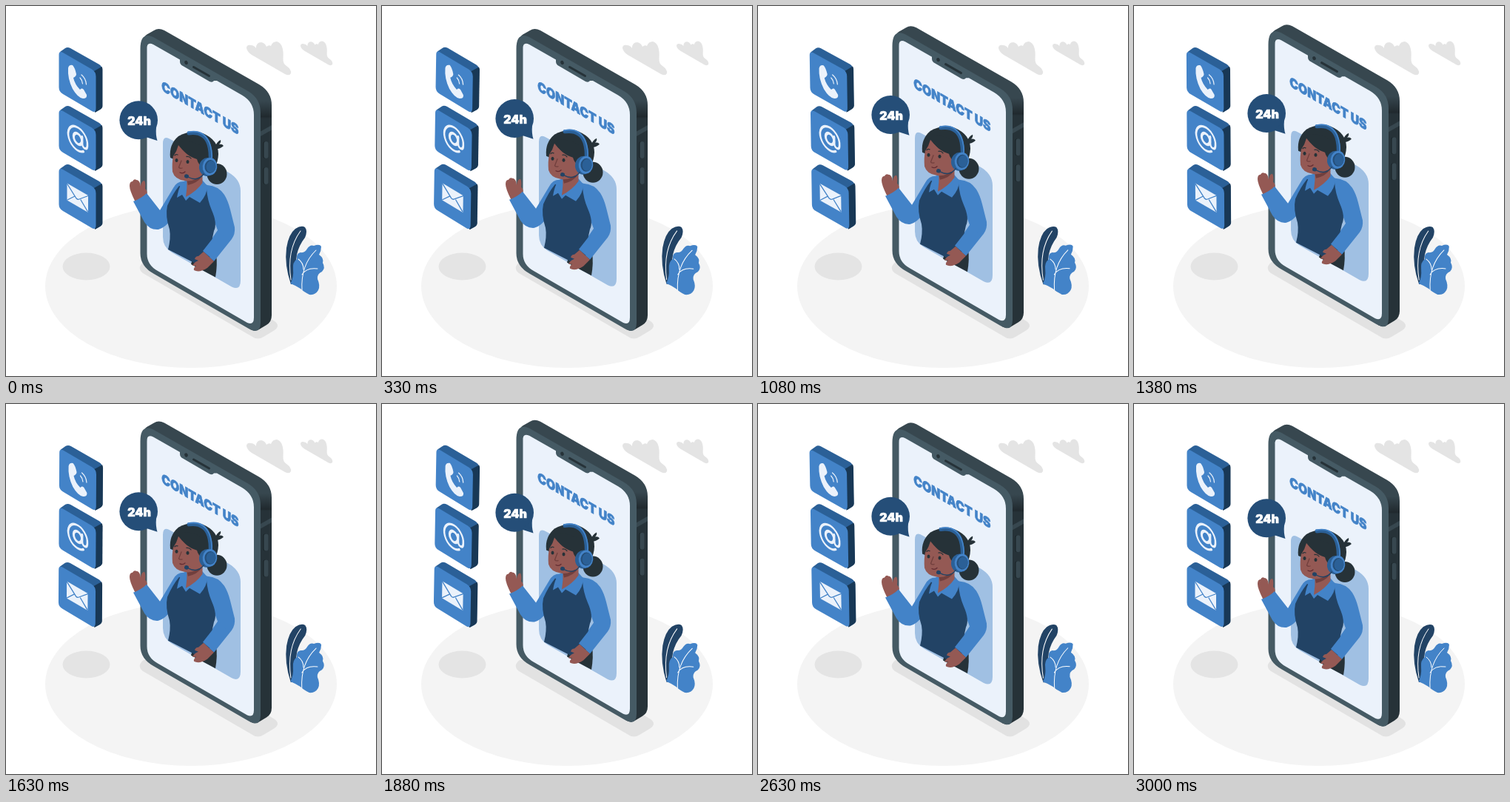
An HTML page with a canvas that plays this animation: 500x500 px, repeating every 3.04 s.

```html
<!DOCTYPE html>
<html lang="en">
<head>
<meta charset="utf-8">
<title>Contact us</title>
<style>
  html, body { margin: 0; width: 100%; height: 100%; overflow: hidden; background: #fff; }
  canvas { display: block; width: 500px; height: 500px; }
</style>
</head>
<body>
<canvas id="stage"></canvas>
<script>
const LOOP = 3040, FLOAT = 3000, WIND = 1500, DELAY = 500;
const BLUE = '#4383c8', MID = '#2b6097', DEEP = '#254e78', NAVY = '#224365', SIDE = '#183856';
const INK = '#263238', SLATE = '#37474f', FRAME = '#455a64', SKIN = '#945954', SKIN2 = '#713f3d';
const PALE = '#ebf2fb', PANEL = '#a0c0e3', GREY = '#e2e2e2';

const canvas = document.getElementById('stage');
const ctx = canvas.getContext('2d');
const ratio = window.devicePixelRatio || 1;
canvas.width = canvas.height = 500 * ratio;

function fill(d, color) {
  ctx.fillStyle = color;
  ctx.fill(new Path2D(d));
}

function line(d, color, width) {
  ctx.strokeStyle = color;
  ctx.lineWidth = width;
  ctx.lineCap = ctx.lineJoin = 'round';
  ctx.stroke(new Path2D(d));
}

function oval(x, y, rx, ry, color, turn = 0) {
  ctx.fillStyle = color;
  ctx.beginPath();
  ctx.ellipse(x, y, rx, ry, turn, 0, Math.PI * 2);
  ctx.fill();
}

function pill(x, y, w, h, color) {
  ctx.fillStyle = color;
  ctx.beginPath();
  ctx.roundRect(x, y, w, h, w / 2);
  ctx.fill();
}

function heavy(text, x, y, size, color) {
  ctx.font = `900 ${size}px Inter, "Open Sans", sans-serif`;
  ctx.fillStyle = ctx.strokeStyle = color;
  ctx.lineWidth = 0.7;
  ctx.lineJoin = 'round';
  ctx.fillText(text, x, y);
  ctx.strokeText(text, x, y);
}

function group(draw) {
  ctx.save();
  draw();
  ctx.restore();
}

function shifted(x, y, draw) {
  group(() => { ctx.translate(x, y); draw(); });
}

function turned(x, y, deg, draw) {
  group(() => {
    ctx.translate(x, y);
    ctx.rotate(deg * Math.PI / 180);
    ctx.translate(-x, -y);
    draw();
  });
}

// Isometric plane facing left, with its zero point at x, y
function iso(x, y, draw) {
  group(() => { ctx.transform(0.866, 0.5, 0, 1, x, y); draw(); });
}

// Linear rise of 10 px and back
function lift(t) {
  if (t < 0) return 0;
  const p = (t % FLOAT) / FLOAT;
  return -10 * (1 - Math.abs(1 - 2 * p));
}

// Linear sway: 0, +1 at a quarter, -1 at three quarters, 0
function sway(t) {
  const p = (t % WIND) / WIND;
  return p < 0.25 ? 4 * p : p < 0.75 ? 2 - 4 * p : 4 * p - 4;
}

function cloud() {
  fill('M325 57Q325 52 331 53Q335 53 338 57Q338 49 345 49Q350 50 352 55Q355 52 358 54Q360 48 366 48Q376 51 374.500 71Q374 78 379 81Q386 86 385 91Q383 95 377 92L332 66Q326 62 325 57Z', '#e4e4e4');
}

function ground() {
  oval(250, 378.500, 197, 110.500, '#f4f4f4');
  oval(108.500, 352, 32, 18.500, '#e4e4e4');
  fill('M186 346Q176 354 185 361L333 447Q340 452 348 447L363 438Q371 432 363 426L230 345Z', GREY);
  cloud();
  group(() => {
    ctx.translate(164, 13);
    ctx.scale(0.72, 0.72);
    cloud();
  });
}

function plant() {
  fill('M385 376Q376 350 379 327Q382 308 391 301Q399 296 404 299Q408 304 404 313Q396 323 393 336Q391 350 391 376Z', NAVY);
  line('M385 370Q379 330 398 304', '#fff', 1);
  fill('M384.500 375Q389 366 388 356Q387 346 393 342Q392 334 398 333Q404 334 407 328Q411 322 416 324Q424 321 426 325Q426 331 423 336Q430 341 428 347Q432 354 427 359Q420 362 421 369Q425 378 422 384Q418 391 410 390Q402 386 398 382Q392 378 384.500 375Z', BLUE);
  line('M400 384Q398 350 419 330M400 363Q406 353 421 355M402 356Q402 347 395 342', '#fff', 1);
}

function handset() {
  fill('M84 84Q85 79 90 80Q93 83 95 92Q95 95 91 97Q93 106 100 113Q103 110 105 113L109 120Q110 125 104 125Q97 124 90 112Q83 98 84 84Z', PALE);
  line('M100 97Q103 100 103.500 105M102 93Q108 98 108.500 106', PALE, 1.2);
}

function atSign() {
  iso(97, 179.500, () => {
    line('M9 12.500A15 15.500 0 1 1 15 1Q15 7.500 10.500 7.500Q7 7 7 3L7 -6.500', PALE, 3);
    ctx.beginPath();
    ctx.ellipse(0, 0, 6.500, 7, 0, 0, Math.PI * 2);
    ctx.lineWidth = 3.600;
    ctx.stroke();
  });
}

function envelope() {
  fill('M82.500 239.500L111 256V279L82.500 262.500Z', PALE);
  line('M82.500 240L95 260Q97 262 99 261L111 256.500M83 262L93 257M110.500 278L101 262', BLUE, 1.3);
}

function card(y) {
  shifted(0, y, () => {
    fill('M73 62L80 57Q83 55 87 57L126 79Q130 82 130 86V135Q130 138 127 140L121 143.500L100 100Z', MID);
    fill('M119 88L129.500 82Q130.500 84 130.500 86V135Q130.500 138 127 140L120 144Z', SIDE);
    fill('M71.500 66Q71.500 60 77 63L116 85.500Q121.500 89 121.500 95V138Q121.500 145 116 142L77 119Q71.500 116 71.500 110Z', BLUE);
  });
}

function cards() {
  [0, 79, 158].forEach(card);
  handset();
  atSign();
  envelope();
}

function phone() {
  const edge = ctx.createLinearGradient(0, 128, 0, 152);
  edge.addColorStop(0, SLATE);
  edge.addColorStop(0.900, '#20292e');
  edge.addColorStop(1, INK);
  fill('M186 44Q188 39 193 37L200 33Q206 29 214 33L342 106Q359 116 359 134V418Q359 427 352 431L342 437Q337 440 330 437L300 400V120Z', edge);
  fill('M181.500 58Q181.500 34 199 42L327 115Q344 125 344 144V428Q344 445 328 436L200 362Q181.500 352 181.500 334Z', FRAME);
  fill('M344 169.500L359 161V167.500L344 176Z', SLATE);
  for (const y of [183, 218]) {
    pill(347.300, y, 6.500, 23, '#1b2428');
    pill(348.500, y, 6, 23, SLATE);
  }
  fill('M190.500 58Q190 48 199 52L235 72.500V75Q235 79 239 81L275 102Q279 104 281 101L285 101L319 120.500Q335 130 335 147V421Q335 432 326 428L205 358Q190.500 350 190.500 335Z', PALE);
  oval(243.500, 76.500, 2.200, 2.700, INK, -0.4);
  line('M253.500 82.500L274.500 94.500', INK, 3);
  iso(210.300, 114, () => {
    ctx.textAlign = 'left';
    heavy('CONTACT US', 0, 0, 18.1, BLUE);
  });
}

function body() {
  fill('M252 342L284 335Q286 350 283 366.500L250 349Z', INK);
  // raised arm
  fill('M174 263Q167 249 167 243Q167 237 171 237Q173 233 176 235Q181 235 182 244Q183 236 187 236Q189 239 188 247Q192 250 190 257L178 267Z', SKIN);
  fill('M242 237Q231 236 226 246L208 276L190 253Q183 260 172 264L187 292Q194 303 206 302Q216 299 222 289L240 270Z', BLUE);
  // resting arm
  fill('M259 236L272 242Q287 243 295 255Q300 263 303 275L309 299Q310 308 305 315L281 345L266 332L286 303L275 274Z', BLUE);
  fill('M234 243Q225 254 218 270Q215 284 221 302Q223 314 219 329L258 349L278 338Q276 323 281 304Q286 294 278 276Q272 262 271 247L250 252Z', NAVY);
  fill('M267 332L281 345L272 354Q261 361 254 357Q253 354 257 351L252 351Q254 346 260 344L255 342Q256 338 260 338Z', SKIN);
  fill('M281 344L266 331L288 303L301 318Z', BLUE);
  fill('M242 236Q234 240 231 259L238 255L243 263L248 258L262 266Q272 255 272 243L265 235Z', BLUE);
  fill('M244.500 232L265.500 222V239Q258 250 243 258Q245 246 244.500 232Z', SKIN);
  fill('M244 234L264 231Q259 239 246 242Z', SKIN2);
}

function head() {
  oval(285, 227, 13.500, 14, INK);
  fill('M282 192Q284 184 290 181Q291 184 288 187Q292 186 294 189Q290 193 282 194Z', INK);
  fill('M222 205Q220 187 233 176Q248 167 266 172Q287 181 287 200Q286 221 271 226L243 214Z', INK);
  fill('M226 203Q231 196 233 188Q242 200 255 205L266 210L266 226Q254 239 241 236Q228 234 225 224Q224 212 226 203Z', SKIN);
  fill('M233 185Q245 178 266 190V217Q260 215 258 207Q241 202 233 185Z', INK);
  oval(230.500, 208.500, 2, 2.500, INK);
  oval(245.500, 210.500, 2, 2.500, INK);
  line('M228 202Q229 200 232 201M244 203.500Q248 203 250 206', INK, 1.3);
  line('M237 209L233.500 218Q235 220 238 219', SKIN2, 1.3);
  line('M235 225Q239 227 242 224', '#632c32', 1.3);
}

function headset() {
  line('M247 172Q268 169 274 187Q277 197 276 210', MID, 5);
  line('M246 170.500Q266 166 274.500 184Q279 195 278 208', BLUE, 1.8);
  oval(272, 217.500, 11, 12.500, MID, 0.1);
  oval(275.500, 217, 9.800, 12, BLUE, 0.1);
  oval(276, 217, 7.500, 9, DEEP, 0.1);
  oval(277, 217, 6.500, 8, MID, 0.1);
  line('M267 227Q259 238 246 231', NAVY, 1.4);
  oval(244, 230, 3, 2.700, NAVY, 0.3);
}

function bubble() {
  oval(179.200, 154.300, 25.800, 26, DEEP);
  fill('M203 164Q202 174 204.500 182L189 177Z', DEEP);
  ctx.textAlign = 'center';
  heavy('24h', 180, 161, 16, '#fff');
}

function agent() {
  fill('M212 186Q212 174 222 180L300 224.500Q317 234 317 250V371Q317 385 305 379.500L224 333Q212 326 212 312Z', PANEL);
  body();
  head();
  headset();
  bubble();
}

function draw(t) {
  ctx.setTransform(ratio, 0, 0, ratio, 0, 0);
  ctx.fillStyle = '#fff';
  ctx.fillRect(0, 0, 500, 500);
  ground();
  turned(404, 344, sway(t), plant);
  turned(101, 178, sway(t), cards);
  shifted(0, lift(t - DELAY), phone);
  shifted(0, lift(t), agent);
}

const start = performance.now();
function tick() {
  const t = (performance.now() - start) % LOOP;
  draw(Math.min(t, FLOAT));
  requestAnimationFrame(tick);
}
tick();
</script>
</body>
</html>
```
